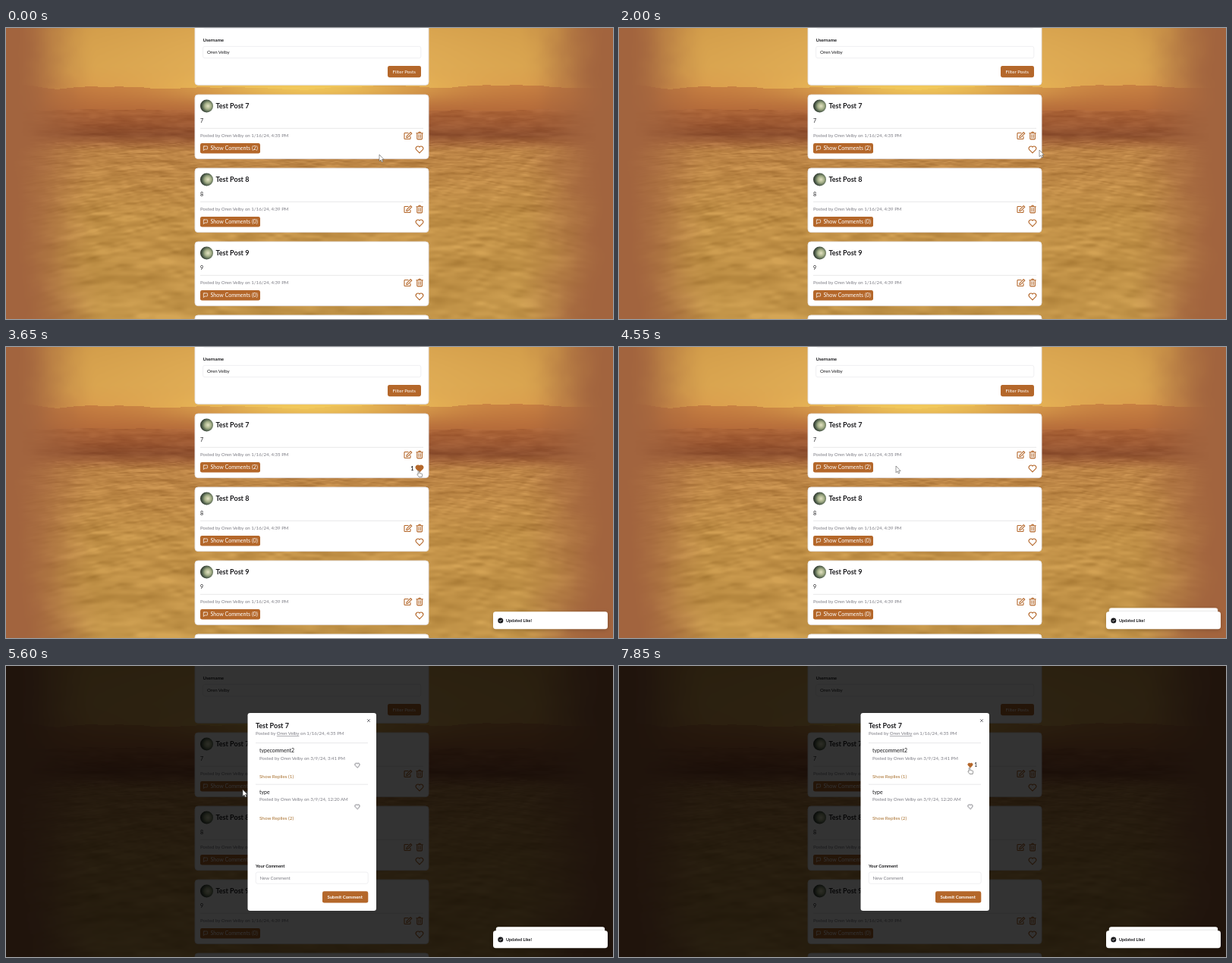
These frames come from a looping animation (800 by 384 pixels, 8 s). An HTML page with a canvas:

```html
<!DOCTYPE html>
<html lang="en">
<head>
<meta charset="utf-8">
<title>Post likes</title>
<style>
  html, body { margin: 0; width: 100%; height: 100%; overflow: hidden; background: #a2643e; }
  canvas, svg { position: absolute; left: 0; top: 0; width: 800px; height: 384px; display: block; }
  text { font-family: Lato, sans-serif; fill: #18181b; }
  .bold { font-weight: 700; }
  .white { fill: #fff; }
  .muted { fill: #7c7c84; }
  .link { fill: #a9712f; }
  .panel { fill: #fff; stroke: #e6e3e6; stroke-width: .9; }
  .field { fill: #fff; stroke: #e4e4e7; stroke-width: .6; }
  .button { fill: #b4672a; }
  .rule { stroke: #e2e2e5; stroke-width: .8; }
  .icon { fill: none; stroke: #b4672a; stroke-width: 1.1; stroke-linejoin: round; stroke-linecap: round; }
  .pivot { transform-box: fill-box; transform-origin: center; }
  .pointer { fill: #fff; stroke: #555; stroke-width: .6; stroke-linejoin: round; }
</style>
</head>
<body>
<canvas id="desert" width="800" height="384"></canvas>
<svg id="stage" viewBox="0 0 800 384"></svg>
<script>
const LOOP = 8000;
const USER = 'Oren Velby';

// ---- Desert backdrop ----
const mix = (a, b, k) => a + (b - a) * k;
const mixColor = (a, b, k) => a.map((v, i) => mix(v, b[i], k));
const smooth = (a, b, v) => {
  const k = Math.min(1, Math.max(0, (v - a) / (b - a)));
  return k * k * (3 - 2 * k);
};
const hash = (x, y) => {
  const n = Math.sin(x * 127.1 + y * 311.7) * 43758.5453;
  return n - Math.floor(n);
};
function noise(x, y) {
  const i = Math.floor(x), j = Math.floor(y);
  const u = smooth(0, 1, x - i), v = smooth(0, 1, y - j);
  return mix(mix(hash(i, j), hash(i + 1, j), u), mix(hash(i, j + 1), hash(i + 1, j + 1), u), v);
}
const fbm = (x, y) => noise(x, y) * .6 + noise(x * 2.1, y * 2.1) * .27 + noise(x * 4.3, y * 4.3) * .13;
const glow = (x, y, cy, rx, ry) => Math.exp(-(((x - 400) / rx) ** 2) - ((y - cy) / ry) ** 2);

function ramp(stops, y) {
  const i = stops.findIndex(s => s[0] > y);
  if (i < 0) return stops[stops.length - 1][1];
  if (i === 0) return stops[0][1];
  const [y0, a] = stops[i - 1], [y1, b] = stops[i];
  return mixColor(a, b, (y - y0) / (y1 - y0));
}
const SKY = [[0, [208, 154, 72]], [50, [214, 160, 76]], [85, [216, 152, 74]]];
const HILLS = [[72, [200, 128, 66]], [106, [182, 108, 58]]];
const GROUND = [[106, [174, 102, 56]], [126, [156, 88, 50]], [140, [142, 80, 47]],
  [150, [164, 102, 58]], [162, [188, 132, 70]], [250, [192, 143, 70]], [384, [194, 148, 72]]];
const EDGE = [162, 100, 62];

function desertColor(x, y) {
  let color;
  if (y < 106 + 3 * noise(x / 25, 3)) {
    const peak = 76 + 14 * (fbm(x / 70, 8) - .4);
    color = y < peak
      ? mixColor(ramp(SKY, y), [236, 188, 96], .6 * glow(x, y, 40, 250, 70))
      : ramp(HILLS, y);
    color = mixColor(color, [244, 206, 92], .85 * glow(x, y, 80, 150, 18));
  } else {
    color = ramp(GROUND, y);
    const depth = Math.max(0, (y - 140) / 244);
    const u = (x - 400) / (46 * (.4 + depth)) + 40;
    const v = 9 * Math.log(.12 + depth) + 30 + Math.sin(x / 90) * .35;
    const slope = fbm(u, v + .16) - fbm(u, v);
    const light = y < 150 ? (fbm(x / 22, y / 4) - .5) * 30 : Math.max(-32, Math.min(18, slope * 120));
    color = color.map((c, i) => c + light * [1, .95, .75][i]);
  }
  const inset = Math.min(x, 799 - x) + (fbm(x / 30, y / 30) - .5) * 20 - 12 * smooth(300, 384, y);
  return mixColor(EDGE, color, smooth(8, 124, inset));
}

const ctx = document.getElementById('desert').getContext('2d');
const picture = ctx.createImageData(800, 384);
for (let y = 0, p = 0; y < 384; y++)
  for (let x = 0; x < 800; x++, p += 4)
    picture.data.set([...desertColor(x, y), 255], p);
ctx.putImageData(picture, 0, 0);

// ---- Interface ----
const text = (x, y, size, str, cls = '') => `<text x="${x}" y="${y}" font-size="${size}" class="${cls}">${str}</text>`;
const box = (x, y, w, h, r, cls) => `<rect x="${x}" y="${y}" width="${w}" height="${h}" rx="${r}" class="${cls}"/>`;
const rule = (x1, x2, y) => `<path class="rule" d="M${x1} ${y}H${x2}"/>`;
const icon = (x, y, d, attrs = '') => `<path class="icon" transform="translate(${x} ${y})" d="${d}" ${attrs}/>`;
const HEART = 'M0 4.4-4.2.2A2.6 2.6 0 0 1 0-3.2 2.6 2.6 0 0 1 4.2.2Z';
const heart = (x, y, scale, style = '') =>
  `<path class="icon" transform="translate(${x} ${y}) scale(${scale})" d="${HEART}" style="${style}"/>`;
const posted = (x, y, when) => text(x, y, 6.1, `Posted by ${USER} on ${when}`, 'muted');

const post = (n, time, comments, top) => `<g transform="translate(0 ${top})">
  ${box(249, 0, 308, 84.6, 4, 'panel')}
  <circle cx="264.5" cy="15" r="8.5" fill="url(#avatar)"/>
  ${text(276.5, 18.4, 9, 'Test Post ' + n, 'bold')}
  ${text(256, 36.5, 7, n)}
  ${rule(256, 550, 44.4)}
  ${posted(256, 56, '1/16/24, ' + time)}
  ${icon(525, 49, 'M5 1.5H.8Q0 1.5 0 2.3V8.7Q0 9.5 .8 9.5H7.2Q8 9.5 8 8.7V6.2M3.2 5.6 8.2.6 9.8 2.2 4.8 7.2 2.8 7.6Z')}
  ${icon(540.9, 48.7, 'M0 2H8.4M2.8 2 3.3.5H5.1L5.6 2M.9 2V9.4Q.9 10.2 1.7 10.2H6.7Q7.5 10.2 7.5 9.4V2')}
  ${icon(540.9, 48.7, 'M2.8 4V8.3M4.2 4V8.3M5.6 4V8.3', 'style="stroke-width:.7"')}
  ${box(256, 64, 79, 13.6, 2.4, 'button')}
  ${icon(260.4, 68, 'M.6 0H4.6Q5.2 0 5.2 .6V3.4Q5.2 4 4.6 4H1.6L0 5.6V.6Q0 0 .6 0Z', 'style="stroke:#fff;stroke-width:.7"')}
  ${text(269.5, 73.2, 7.1, `Show Comments (${comments})`, 'white')}
  ${n === 7 ? '' : heart(545, 72.4, 1)}
</g>`;

const comment = (title, when, replies, top) => `<g transform="translate(0 ${top})">
  ${rule(329, 477, 0)}
  ${text(334, 12.9, 6.9, title)}
  ${posted(334, 22, when)}
  ${text(334, 46.8, 6.3, `Show Replies (${replies})`, 'link')}
</g>`;

const toast = id => `<g id="${id}" class="pivot" opacity="0">
  <rect x="642" y="349.3" width="151" height="22.9" rx="3.4" fill="#fff" style="filter:drop-shadow(0 1.5px 2.5px #0003)"/>
  <circle cx="651.8" cy="360.9" r="3.5" fill="#18181b"/>
  <path d="M650.2 361 651.4 362.1 653.5 359.8" fill="none" stroke="#fff" stroke-width=".8"/>
  ${text(659, 362.9, 5.5, 'Updated Like!', 'bold')}
</g>`;

const FILLED = 'fill:#b4672a';
const SMALL = 'stroke:#62626a;stroke-width:1.3';

document.getElementById('stage').innerHTML = `
<defs><radialGradient id="avatar" cx=".6" cy=".5" r=".62">
  <stop offset="0" stop-color="#e4e3c4"/><stop offset=".4" stop-color="#a5b088"/>
  <stop offset=".75" stop-color="#4a5a48"/><stop offset="1" stop-color="#22261f"/>
</radialGradient></defs>
${box(249, -20, 308, 95.3, 4, 'panel')}
${box(259.6, -15, 287.2, 15.4, 2.4, 'field')}
${text(259.5, 18.2, 6.1, 'Username', 'bold')}
${box(259.6, 24.3, 287.2, 15.4, 2.4, 'field')}
${text(265, 34.1, 6.1, USER)}
${box(503, 50, 44, 15.2, 2.4, 'button')}
${text(509.6, 59.8, 6.2, 'Filter Posts', 'white')}
${post(7, '4:35 PM', 2, 88)}
${post(8, '4:39 PM', 0, 185)}
${post(9, '4:39 PM', 0, 282)}
${box(249, 379, 308, 20, 4, 'panel')}
<g id="postPlain">${heart(545, 160.4, 1)}</g>
<g id="postLiked">${heart(545, 160.4, 1, FILLED)}${text(533.4, 162.6, 6.6, 1, 'bold')}</g>
<rect id="shade" width="800" height="384" opacity="0"/>
<g id="dialog" class="pivot" opacity="0">
  <rect x="318.5" y="62" width="169.5" height="261" rx="3.2" fill="#fff"/>
  <path d="M476 70.2 479.8 74M479.8 70.2 476 74" stroke="#55555c" stroke-width=".8"/>
  ${text(329, 81.5, 9, 'Test Post 7', 'bold')}
  ${text(329, 91, 6.1, `Posted by <tspan text-decoration="underline">${USER}</tspan> on 1/16/24, 4:35 PM`, 'muted')}
  ${comment('typecomment2', '3/9/24, 3:41 PM', 1, 101.5)}
  ${comment('type', '3/9/24, 12:20 AM', 2, 156.2)}
  <g id="commentPlain">${heart(463, 131, .66, SMALL)}</g>
  <g id="commentLiked">${heart(463, 131, .66, FILLED)}${text(468.2, 133.3, 6.9, 1)}</g>
  ${heart(463, 185.7, .66, SMALL)}
  ${text(329, 265.7, 5.8, 'Your Comment', 'bold')}
  ${box(329.2, 272, 148, 15.2, 2.4, 'field')}
  ${text(334.5, 281.8, 6.1, 'New Comment', 'muted')}
  ${box(417, 297.3, 60.3, 15.3, 2.4, 'button')}
  ${text(423.5, 307.1, 6, 'Submit Comment', 'white bold')}
</g>
${toast('toastA')}${toast('toastB')}${toast('toastC')}
<g id="cursor">
  <path id="arrow" class="pointer" d="M0 0V8.8L2 7 3.3 10 4.8 9.3 3.5 6.5H6.1Z"/>
  <path id="hand" class="pointer" d="M-.8 5V.8A.8.8 0 0 1 .8.8V3.5L4 4.2Q4.8 4.5 4.7 5.4L4.2 8.5H.2L-1.9 5.7Q-2.3 4.7-1.5 4.6Z"/>
</g>`;

// ---- Motion ----
const byId = id => document.getElementById(id);
const play = (id, steps) => byId(id).animate(
  steps.map(([ms, props, easing = 'linear']) => ({ offset: ms / LOOP, easing, ...props })),
  { duration: LOOP, iterations: Infinity });

// Flips visibility at each given time.
const toggle = (id, visible, times) => play(id, [0, ...times, LOOP].map((ms, i) =>
  [ms, { opacity: (visible + Math.min(i, times.length)) % 2 }, 'step-end']));

const LIKE = 2150, UNLIKE = 3850, OPEN = 5400, REPLY_LIKE = 7450;

play('cursor', [
  [0, 492, 167], [50, 492, 167], [800, 528, 164], [900, 528, 164], [1700, 556, 163],
  [1750, 556, 163], [2000, 554, 161], [2130, 544, 163], [4350, 544, 163], [4550, 365, 157],
  [4750, 312, 163], [5600, 312, 163], [6200, 448, 140], [6500, 462, 134], [LOOP, 462, 134]
].map(([ms, x, y]) => [ms, { transform: `translate(${x}px, ${y}px)` }, 'ease-in-out']));

const POINTER_SWAPS = [2080, 4400, 4640, OPEN, 6450];
toggle('arrow', 1, POINTER_SWAPS);
toggle('hand', 0, POINTER_SWAPS);
toggle('postPlain', 1, [LIKE, UNLIKE]);
toggle('postLiked', 0, [LIKE, UNLIKE]);
toggle('commentPlain', 1, [REPLY_LIKE]);
toggle('commentLiked', 0, [REPLY_LIKE]);

const pose = (opacity, y, s = 1) => ({ opacity, transform: `translate(0px, ${y}px) scale(${s})` });

play('shade', [[0, 0], [OPEN, .64], [OPEN + 100, .8], [LOOP, .8]]
  .map(([ms, opacity]) => [ms, { opacity }, 'step-end']));
play('dialog', [[0, 0, 5, .95], [OPEN, .8, 1, .99], [OPEN + 100, 1, 0, 1], [LOOP, 1, 0, 1]]
  .map(([ms, ...place]) => [ms, pose(...place), 'step-end']));

const HIDDEN = pose(0, 23), FRONT = pose(1, 0), BACK = pose(1, -5.5, .95), GONE = pose(0, -5.5, .95);
const SLIDE = 350;
const enter = ms => [[0, HIDDEN], [ms, HIDDEN, 'ease'], [ms + SLIDE, FRONT]];
const recede = ms => [[ms, FRONT, 'ease'], [ms + SLIDE, BACK]];

play('toastA', [...enter(LIKE), ...recede(UNLIKE), [6100, BACK], [6250, GONE], [LOOP, GONE]]);
play('toastB', [...enter(UNLIKE), ...recede(REPLY_LIKE), [LOOP, BACK]]);
play('toastC', [...enter(REPLY_LIKE), [LOOP, FRONT]]);
</script>
</body>
</html>
```
